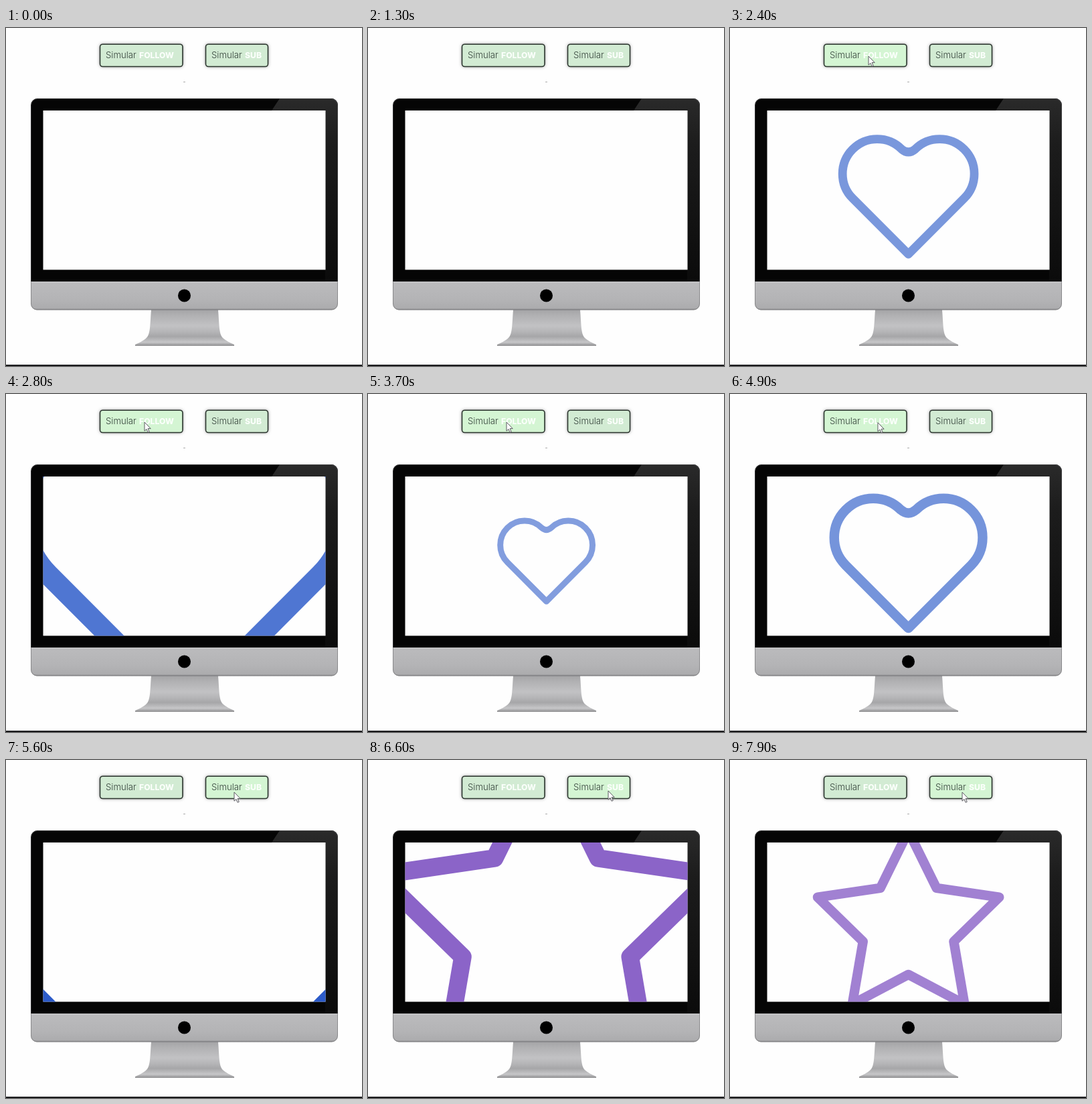
An HTML page with a canvas that plays this animation: 532 by 504 pixels, repeating every 8000 ms.

```html
<!DOCTYPE html>
<html lang="es">
<head>
<meta charset="utf-8">
<title>Simulador de alertas</title>
<style>
html, body { margin: 0; width: 100%; height: 100%; overflow: hidden; background: #fff; }
canvas { display: block; }
</style>
</head>
<body>
<canvas id="stage" width="532" height="504"></canvas>
<script>
const ctx = document.getElementById('stage').getContext('2d');
const LOOP = 8000, STEP = 100;
const SCREEN = { x: 55.5, y: 123, w: 422, h: 237.5 };
const CENTER = 266.6;

// Icon outlines on a 24-unit grid
const heart = new Path2D('M13.06 4.61a5.5 5.5 0 0 1 7.78 7.78L12 21.23 3.16 12.39a5.5 5.5 0 0 1 7.78-7.78Q12 5.5 13.06 4.61z');
const star = new Path2D('M12 2 15.09 8.26 22 9.27 17 14.14 18.18 21.02 12 17.77 5.82 21.02 7 14.14 2 9.27 8.91 8.26z');
const HEART = { path: heart, line: 1.36, midY: 11.28, y: 243.6, rgb: '40,88,200' };
const STAR = { path: star, line: 1.06, midY: 12.15, y: 243.7, rgb: '118,72,190' };

const GROWTH = 0.034; // grid scale gained per ms
const PULSE = 1500;
const pulses = [
  [2123, HEART], [3506, HEART], [4588, HEART],
  [5864, STAR], [7501, STAR]
];

// Pointer stops: time, x, y
const pointer = [
  [1600, 262, 478], [2000, 207, 42], [4800, 207, 42], [5300, 341, 48],
  [5900, 341, 48], [6300, 359, 46], [6900, 359, 46], [7400, 347, 48], [8000, 347, 48]
];
const arrow = new Path2D('M0 0V13.2L3 10.4 5.1 15.3 7.2 14.4 5.1 9.6H9.2z');

const buttons = [
  { x: 140.5, w: 123.5, tag: 'FOLLOW', tagX: 199 },
  { x: 298.5, w: 93, tag: 'SUB', tagX: 357 }
];

function gradient(x0, y0, x1, y1, ...stops) {
  const g = ctx.createLinearGradient(x0, y0, x1, y1);
  stops.forEach(([at, color]) => g.addColorStop(at, color));
  return g;
}

function roundBox(x, y, w, h, r) {
  ctx.beginPath();
  ctx.roundRect(x, y, w, h, r);
}

function pointerAt(t) {
  if (t < pointer[0][0]) return null;
  const i = pointer.findIndex(p => p[0] > t);
  const [t0, x0, y0] = pointer[i - 1], [t1, x1, y1] = pointer[i];
  const p = (t - t0) / (t1 - t0), e = p * p * (3 - 2 * p);
  return { x: x0 + (x1 - x0) * e, y: y0 + (y1 - y0) * e };
}

function drawButton(b, pos) {
  const hover = pos && pos.x > b.x && pos.x < b.x + b.w && pos.y > 24 && pos.y < 58;
  ctx.save();
  ctx.shadowColor = 'rgba(0,0,0,.5)';
  ctx.shadowBlur = 5;
  ctx.fillStyle = hover ? '#d4f5d3' : '#d2ebd3';
  roundBox(b.x, 24.2, b.w, 33.3, 4);
  ctx.fill();
  ctx.restore();
  ctx.strokeStyle = '#2c362f';
  ctx.lineWidth = 1.6;
  ctx.stroke();

  ctx.textBaseline = 'alphabetic';
  ctx.fillStyle = '#36443c';
  ctx.font = '300 13.2px Inter, sans-serif';
  ctx.fillText('Simular', b.x + 8.5, 45);
  ctx.fillStyle = '#fbfffb';
  ctx.font = '800 12.2px Inter, sans-serif';
  ctx.fillText(b.tag, b.tagX, 45);
}

function drawStand() {
  ctx.beginPath();
  ctx.moveTo(217, 420);
  ctx.lineTo(317, 420);
  ctx.bezierCurveTo(319, 445, 318, 457, 325, 463);
  ctx.quadraticCurveTo(331, 468, 341, 472);
  ctx.lineTo(341, 474);
  ctx.lineTo(193, 474);
  ctx.lineTo(193, 472);
  ctx.quadraticCurveTo(203, 468, 209, 463);
  ctx.bezierCurveTo(216, 457, 215, 445, 217, 420);
  ctx.fillStyle = gradient(0, 420, 0, 474,
    [0, '#a4a4a6'], [0.15, '#b0b0b2'], [0.45, '#c2c2c4'], [0.62, '#b4b4b6'], [0.74, '#a6a6a8'], [0.9, '#c6c6c8'], [1, '#8e8e90']);
  ctx.fill();
}

function drawMonitor() {
  drawStand();
  ctx.save();
  roundBox(37, 105, 459, 315.5, [10, 10, 9, 9]);
  ctx.clip();
  ctx.fillStyle = '#050505';
  ctx.fillRect(37, 105, 459, 273);

  // Gloss on the right edge
  ctx.beginPath();
  ctx.moveTo(409, 105);
  ctx.lineTo(496, 105);
  ctx.lineTo(496, 378);
  ctx.lineTo(477, 378);
  ctx.lineTo(477, 123);
  ctx.lineTo(397, 123);
  ctx.fillStyle = gradient(0, 105, 0, 378, [0, '#2a2a2a'], [0.25, '#1c1c1c'], [1, '#0b0b0b']);
  ctx.fill();

  ctx.fillStyle = gradient(0, 378, 0, 421,
    [0, '#c4c4c6'], [0.08, '#bababc'], [0.6, '#b4b4b6'], [0.92, '#acacae'], [1, '#88888a']);
  ctx.fillRect(37, 378, 459, 43);
  ctx.restore();

  roundBox(37.5, 105.5, 458, 314.5, [10, 10, 9, 9]);
  ctx.strokeStyle = 'rgba(95,95,97,.5)';
  ctx.lineWidth = 1;
  ctx.stroke();

  ctx.fillStyle = '#000';
  ctx.beginPath();
  ctx.arc(266.5, 399, 9.5, 0, Math.PI * 2);
  ctx.fill();

  ctx.fillStyle = '#fefefe';
  ctx.fillRect(SCREEN.x, SCREEN.y, SCREEN.w, SCREEN.h);
}

function drawPulse(icon, age) {
  const scale = age * GROWTH;
  const alpha = Math.min(1, 0.48 + 0.0145 * scale);
  ctx.save();
  ctx.beginPath();
  ctx.rect(SCREEN.x, SCREEN.y, SCREEN.w, SCREEN.h);
  ctx.clip();
  ctx.translate(CENTER, icon.y);
  ctx.scale(scale, scale);
  ctx.translate(-12, -icon.midY);
  ctx.lineWidth = icon.line;
  ctx.lineJoin = 'round';
  ctx.strokeStyle = `rgba(${icon.rgb},${alpha})`;
  ctx.stroke(icon.path);
  ctx.restore();
}

function drawPointer({ x, y }) {
  ctx.save();
  ctx.translate(x, y);
  ctx.fillStyle = '#fff';
  ctx.strokeStyle = '#5a5a60';
  ctx.lineWidth = 1;
  ctx.fill(arrow);
  ctx.stroke(arrow);
  ctx.restore();
}

function draw(t) {
  ctx.fillStyle = '#fefefe';
  ctx.fillRect(0, 0, 532, 504);
  const pos = pointerAt(t);
  buttons.forEach(b => drawButton(b, pos));
  ctx.fillStyle = '#aaa';
  ctx.fillRect(265, 80, 3, 1);
  drawMonitor();
  for (const [start, icon] of pulses) {
    const age = t - start;
    if (age > 0 && age < PULSE) drawPulse(icon, age);
  }
  ctx.fillStyle = '#1c1c1e';
  ctx.fillRect(0, 502, 532, 2);
  if (pos) drawPointer(pos);
}

function frame() {
  const t = performance.now() % LOOP;
  draw(Math.floor(t / STEP) * STEP);
  requestAnimationFrame(frame);
}
frame();
</script>
</body>
</html>
```
